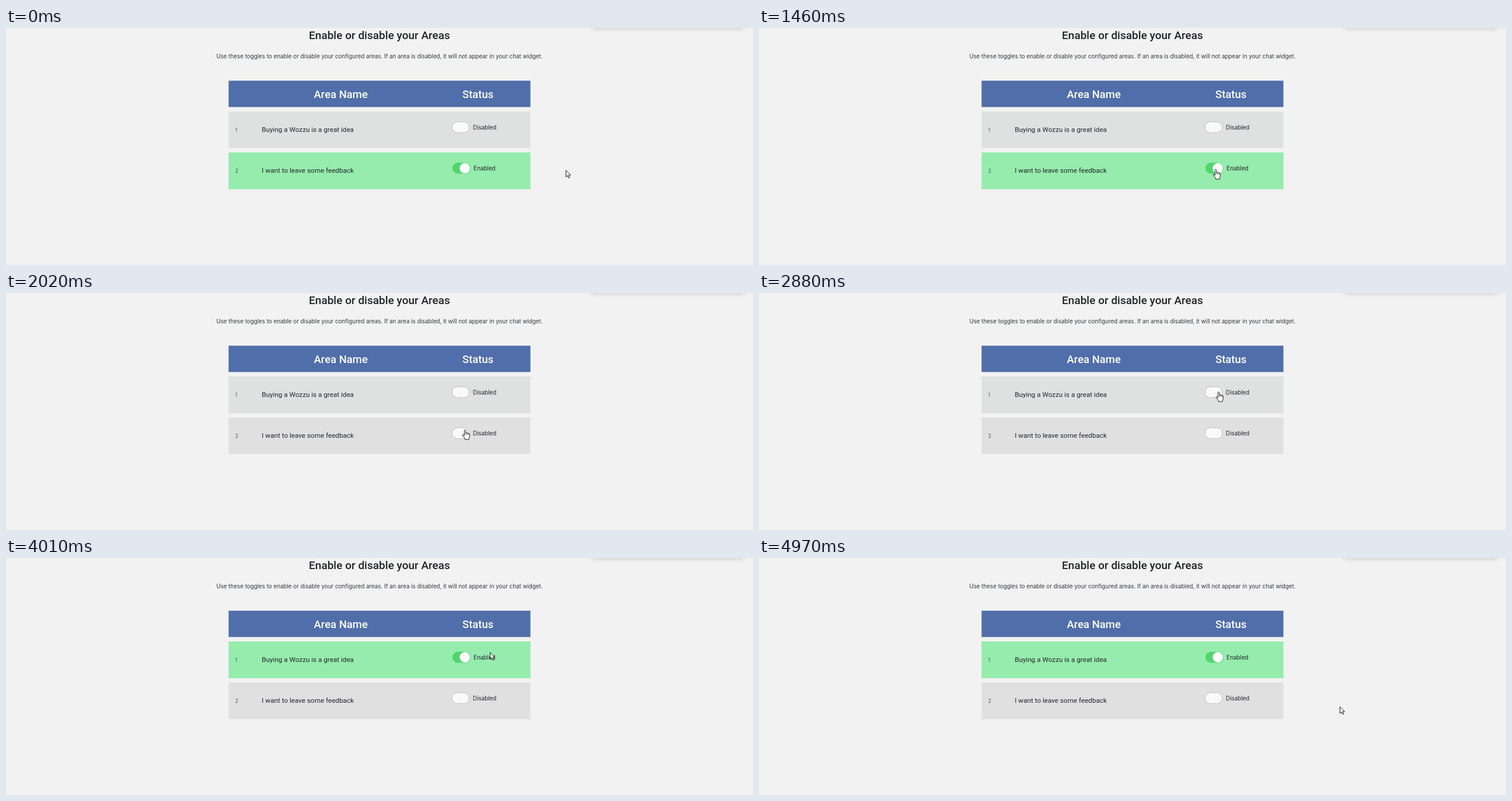
An HTML page that plays this animation: 1280x406 px, repeating every 5250 ms.

```html
<!DOCTYPE html>
<html lang="en">
<head>
<meta charset="utf-8">
<title>Enable or disable your Areas</title>
<style>
  html, body { margin: 0; width: 100%; height: 100%; overflow: hidden; background: #f2f2f2; }
  svg { display: block; width: 100vw; height: 100vh; }
  text { fill: #212529; font-family: Inter, "Open Sans", sans-serif; }
  .title, .head, .name { font-family: Roboto, "Noto Sans", sans-serif; }
  .title { font-size: 19px; font-weight: 500; }
  .head { font-size: 18.5px; font-weight: 500; fill: #fff; }
  .name { font-size: 11.7px; }
  .intro { font-size: 9.8px; fill: #34383c; }
  .label { font-size: 9.8px; }
  .num { font-size: 8.5px; font-weight: 300; }
  .mid { text-anchor: middle; }
</style>
</head>
<body>
<svg viewBox="0 0 1280 406" preserveAspectRatio="none">
  <defs>
    <filter id="soft" x="-20%" y="-200%" width="140%" height="500%">
      <feGaussianBlur stdDeviation="5"/>
    </filter>
  </defs>
  <rect width="1280" height="406" fill="#f2f2f2"/>
  <rect x="1001" y="-24" width="267" height="25" rx="8" opacity=".16" filter="url(#soft)"/>
  <text class="title mid" x="640" y="19">Enable or disable your Areas</text>
  <text class="intro mid" x="640" y="51.5">Use these toggles to enable or disable your configured areas. If an area is disabled, it will not appear in your chat widget.</text>
  <rect x="381.4" y="90.3" width="517.2" height="45.1" fill="#506ea9"/>
  <text class="head mid" x="573.7" y="120">Area Name</text>
  <text class="head mid" x="808.7" y="120">Status</text>
  <g id="rows"></g>
  <g id="ring" fill="none">
    <circle r="10" stroke="#000"/>
    <circle r="9" stroke="#fff"/>
  </g>
  <g id="cursor" fill="#fff" stroke="#000" stroke-width=".9" stroke-linejoin="round">
    <path id="arrow" d="M.5 .8V12.2L3.2 9.7 5 13.9 6.9 13.1 5.1 9H8.5Z"/>
    <g id="hand">
      <path d="M-.6 10.6V1.6Q-.6 .5 .7 .5T2 1.6V6Q2 5 3.2 5.2T4.4 6.3Q4.6 5.4 5.6 5.7T6.6 7Q7 6.2 7.8 6.7T8.3 8V12Q8.3 13.5 7.2 14.7V17H.6V15.3L-3.6 10.2Q-4.2 9 -3.2 8.6Q-2.2 8.4 -.6 10.6Z"/>
      <path fill="none" stroke-width=".7" d="M2 6V9M4.4 6.3V9M6.6 7V9"/>
    </g>
  </g>
</svg>
<script>
const LOOP = 5250;
const START = [959, 243];
const $ = id => document.getElementById(id);
const show = (el, on) => el.setAttribute("visibility", on ? "visible" : "hidden");
const move = (el, x, y) => el.setAttribute("transform", `translate(${x} ${y})`);

const smooth = u => u * u * (3 - 2 * u);
const easeOut = u => 1 - (1 - u) ** 2;

// Pointer strokes: first and last step in ms, step count, end point, bend point
const strokes = [
  { from: 270, to: 270, steps: 1, end: [958, 242] },
  { from: 410, to: 870, steps: 8, end: [787, 240], bend: [890, 220] },
  { from: 940, to: 940, steps: 1, end: [782, 242] },
  { from: 1690, to: 2020, steps: 5, end: [786, 234] },
  { from: 2100, to: 2100, steps: 1, end: [791, 217] },
  { from: 2150, to: 2420, steps: 5, end: [787, 169], bend: [754, 195] },
  { from: 3810, to: 4280, steps: 8, end: [934, 180], bend: [850, 149] },
  { from: 4350, to: 4830, steps: 8, end: [995, 251], bend: [981, 208], ease: easeOut },
  { from: 4900, to: 4970, steps: 2, end: [995, 254] }
];

const clicks = [
  { from: 1330, to: 1460 },
  { from: 2750, to: 2880 }
];

const rowData = [
  { y: 143, num: 1, name: "Buying a Wozzu is a great idea", grey: "#dee1e0", enabled: t => t >= 3420 },
  { y: 213.2, num: 2, name: "I want to leave some feedback", grey: "#e0e0e0", enabled: t => t < 1610 }
];

const panel = (fill, cls = "") =>
  `<rect class="${cls}" x="381.4" width="517.2" height="63" fill="${fill}"/>`;

const rowMarkup = ({ y, num, name, grey }) => `<g transform="translate(0 ${y})">
  ${panel(grey)}
  ${panel("#95ecad", "on")}
  <text class="num" x="392.7" y="34.5">${num}</text>
  <text class="name" x="438.3" y="35.3">${name}</text>
  <g class="on">
    <rect x="765" y="17.6" width="31" height="18.8" rx="9.4" fill="#50d66b"/>
    <circle cx="786.2" cy="27" r="8.9" fill="#fff"/>
    <text class="label mid" x="820" y="30.5">Enabled</text>
  </g>
  <g class="off">
    <rect x="764.2" y="17.7" width="29.6" height="18.5" rx="9.2" fill="#fafafa" stroke="#b8bab9" stroke-width=".9"/>
    <path d="M776 35.6A9 9 0 0 0 782 27" fill="none" stroke="#e8e8e8" stroke-width=".8"/>
    <text class="label mid" x="820.2" y="30.5">Disabled</text>
  </g>
</g>`;

$("rows").innerHTML = rowData.map(rowMarkup).join("");
const rows = rowData.map((data, i) => {
  const el = $("rows").children[i];
  return { ...data, on: el.querySelectorAll(".on"), off: el.querySelectorAll(".off") };
});

function pointerAt(t) {
  let pos = START;
  for (const { from, to, steps, end, bend, ease = smooth } of strokes) {
    if (t < from) break;
    const gap = (to - from) / (steps - 1) || 1;
    const step = Math.floor((t - from) / gap + 1e-6) + 1;
    const e = ease(Math.min(1, step / steps));
    pos = pos.map((p, i) => {
      const c = bend ? bend[i] : (p + end[i]) / 2;
      return (1 - e) ** 2 * p + 2 * e * (1 - e) * c + e * e * end[i];
    });
  }
  return pos.map(Math.round);
}

const overToggle = (x, y) =>
  x > 763 && x < 797 && ((y >= 160 && y < 181) || (y >= 230 && y < 251));

function draw(t) {
  for (const row of rows) {
    const on = row.enabled(t);
    row.on.forEach(el => show(el, on));
    row.off.forEach(el => show(el, !on));
  }
  const [x, y] = pointerAt(t);
  const hand = overToggle(x, y);
  move($("cursor"), x, y);
  show($("hand"), hand);
  show($("arrow"), !hand);
  move($("ring"), x, y);
  show($("ring"), clicks.some(c => t >= c.from && t < c.to));
}

const begin = performance.now();
function tick() {
  draw((performance.now() - begin) % LOOP);
  requestAnimationFrame(tick);
}
tick();
</script>
</body>
</html>
```
